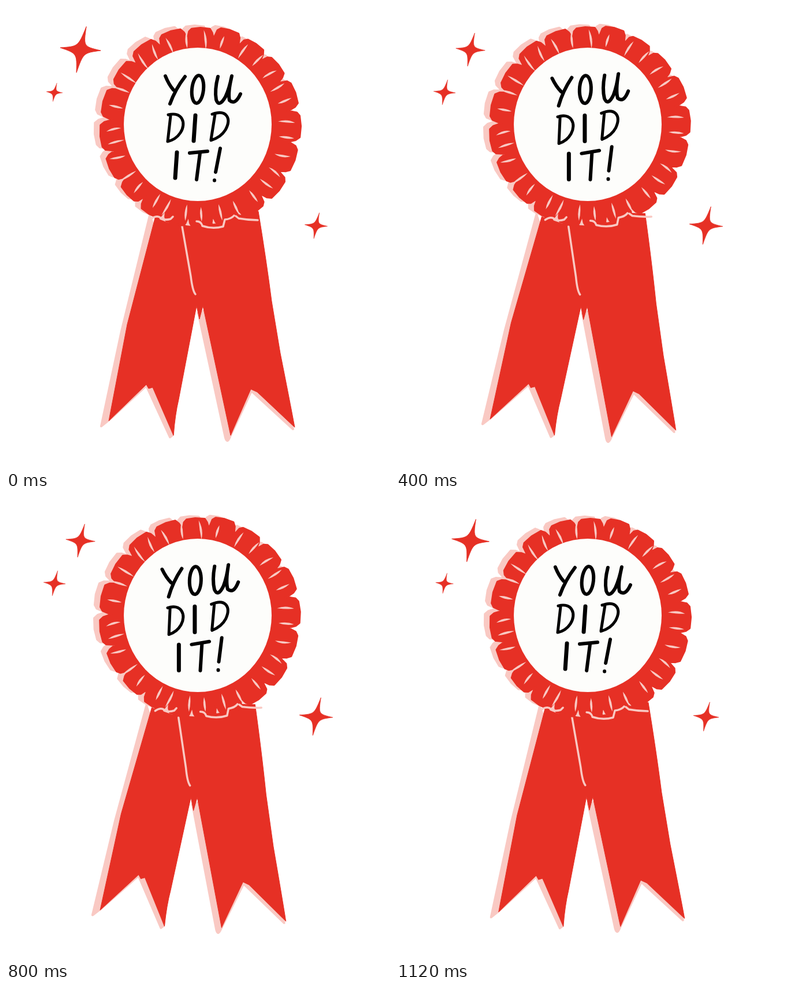
An HTML page that plays this animation: 665x800 px, repeating every 1.2 s.

```html
<!DOCTYPE html>
<html lang="en">
<head>
<meta charset="utf-8">
<title>You did it!</title>
<style>
html, body { margin: 0; width: 100%; height: 100%; overflow: hidden; background: #fff; }
svg { display: block; width: 100%; height: 100%; }
.red { fill: #e63025; stroke: #e63025; }
.pink { fill: #f9c9c3; stroke: #f9c9c3; stroke-width: 4; }
.line { fill: none; stroke: #f9c9c3; stroke-width: 3.5; }
.ink { fill: none; stroke: #000; stroke-width: 6; }
</style>
</head>
<body>
<svg viewBox="0 0 665 800" stroke-linejoin="round" stroke-linecap="round" role="img" aria-label="You did it!">
  <defs>
    <path id="star" d="M10-40C5-6 5-6 35 1C5 5 5 5-7 39C-6 6-6 6-35-4C-4-6-4-6 10-40Z"/>
    <path id="ruffle"/>
  </defs>

  <g id="ribbons">
    <path class="pink" d="M249 362L200 562 165 726 180 714 243 656 284 745 289 741 300 500Z"/>
    <path class="pink" d="M333 530L380 746Q383 757 388 744L425 665 497 731 440 500Z"/>
    <path class="red" d="M261 355L210 550 178 717 243 654 247 661 254 659 290 742
      Q293 705 299 680L330 518 335 541 341 518 389 742 424 662 435 667 500 728
      Q491 680 475 600L460 510Q451 440 437 355Z"/>
    <path class="line" d="M305 381L320 467Q323 492 328 498"/>
  </g>

  <g id="rosette">
    <use href="#ruffle" class="pink" x="-10" y="-4"/>
    <use href="#ruffle" class="red" stroke-width="4"/>
    <path class="line" d="M252 367Q262 361 268 366T285 368L289 364M330 372Q338 372 340 380Q358 386 376 381L379 369Q390 368 395 362M398 363L403 367Q420 370 436 370"/>
    <path id="creases" fill="#f9c9c3"/>
  </g>
  <ellipse cx="332" cy="204.5" rx="128" ry="132.5" fill="#fdfdfb"/>

  <g id="words" class="ink">
    <path d="M276 121Q282 136 290 145M310 122Q293 144 284 169"/>
    <ellipse cx="332" cy="144" rx="10" ry="24" transform="rotate(6 332 144)"/>
    <path d="M367 122Q361 145 364 162Q369 176 380 157Q387 142 391 121Q384 150 387 163Q397 172 406 152"/>
    <path stroke-width="5" d="M285 190L280 234M281 188C305 182 313 202 302 219Q294 231 280 234"/>
    <path stroke-width="7" d="M328 189L325 233M296 253L293 297"/>
    <path stroke-width="5" d="M362 187L355 231M357 187C382 178 391 194 380 214Q372 227 355 232"/>
    <path d="M318 254L349 251M336 254L330 300M371 246L363 287M361 301v.5"/>
  </g>

  <use id="s0" href="#star" class="red"/>
  <use id="s1" href="#star" class="red"/>
  <use id="s2" href="#star" class="red"/>
</svg>
<script>
const $ = id => document.getElementById(id);
const LOOP = 1200, STEP = 80, PLEATS = 20, CREASES = 31;
const rad = deg => deg * Math.PI / 180;

let seed = 7;
const jitter = size => {
  seed = seed * 16807 % 2147483647;
  return (seed / 2147483647 * 2 - 1) * size;
};

// Point on the rosette: degrees clockwise from the top, and radius
const polar = (deg, r) => `${337 + r * Math.sin(rad(deg))} ${209 - r * Math.cos(rad(deg))} `;

// Hand-cut pleats are not quite evenly spaced
const uneven = deg => {
  const a = rad(deg), s = Math.sin(a);
  return deg + 2.5 * s - 3 * Math.sin(2 * a) - 3 * s * s;
};

let outline = '';
for (let i = 0; i < PLEATS; i++) {
  const from = uneven((i - .5) * 360 / PLEATS), to = uneven((i + .5) * 360 / PLEATS);
  const at = (part, r) => polar(from + (to - from) * part, r);
  const r = 172 + jitter(2);
  outline += at(0, 153) + at(.1, r - 4) + at(.2, r) + at(.5, r + 1) + at(.82, r) + at(.91, r - 6);
}
$('ruffle').setAttribute('d', `M${outline}Z`);

let creases = '';
for (let i = 0; i < CREASES; i++) {
  const a = 27 + i * 360 / CREASES + jitter(2), b = a + jitter(2);
  const inner = polar(a, 137 + jitter(3)), outer = polar(b, 165 + jitter(3));
  creases += `M${inner}Q${polar(a + 1.5, 151)}${outer}Q${polar(a - 1.5, 151)}${inner}Z`;
}
$('creases').setAttribute('d', creases);

// Sparkles: x, y, size at rest, size at the other end of the pulse
const stars = [[129, 76, 1, .7], [84, 149.5, .4, .55], [537, 380, .56, .84]];

const ease = x => x < .5 ? (2 * x) ** 2.7 / 2 : 1 - (2 - 2 * x) ** 2.7 / 2;
const there = (t, period) => Math.min(t % period, period - t % period);
const set = (id, value) => $(id).setAttribute('transform', value);

function draw(now) {
  const t = Math.floor(now % LOOP / STEP) * STEP;
  const swing = ease(there(t, LOOP) / 600);
  set('ribbons', `rotate(${1.78 * swing} 300 139)`);
  set('rosette', `rotate(${-3.2 * swing} 310 232)`);
  set('words', `rotate(${-4.7 * swing} 332 205)`);

  const pulse = (1 - Math.cos(Math.PI * Math.min(1, there(t, 600) / 240))) / 2;
  stars.forEach(([x, y, a, b], i) => set('s' + i, `translate(${x} ${y}) scale(${a + (b - a) * pulse})`));
  requestAnimationFrame(() => draw(performance.now() - start));
}
const start = performance.now();
draw(0);
</script>
</body>
</html>
```
